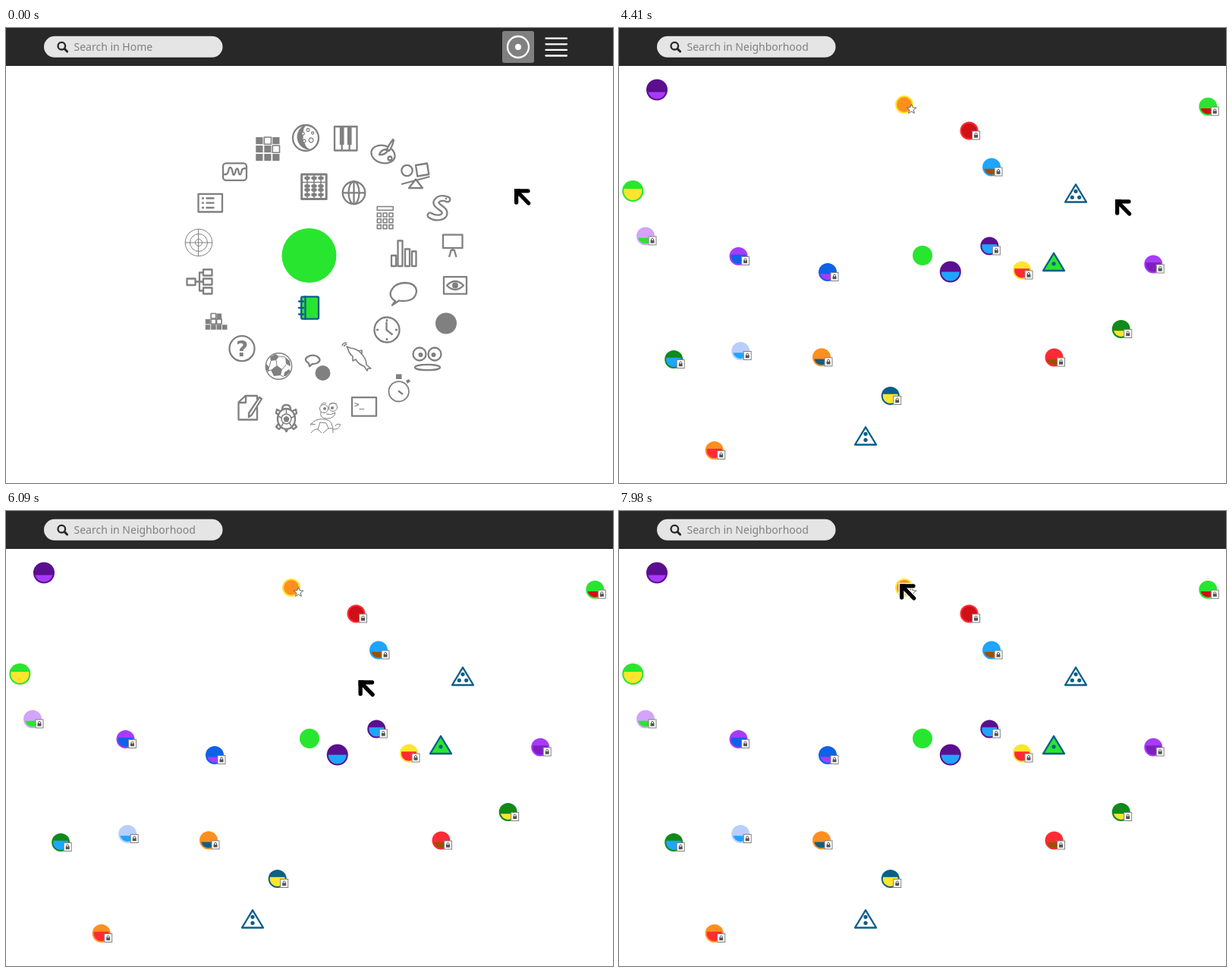
Animation, 800 px wide and 600 px high, one loop 8000 ms. Source, as an HTML page:

```html
<!DOCTYPE html>
<html lang="en">
<head>
<meta charset="utf-8">
<title>Neighborhood view</title>
<style>
  html, body { margin: 0; width: 100%; height: 100%; overflow: hidden; background: #fff; }
  svg { display: block; width: 100vw; height: 100vh; }
  .search { font: 500 14px "Noto Sans", sans-serif; fill: #808080; }
  .title { font: 48px "DejaVu Sans", sans-serif; fill: #808080; }
  .key { font: bold 62px "DejaVu Sans", sans-serif; }
  .help { font: bold 28px "DejaVu Sans", sans-serif; text-anchor: middle; }
  .prompt { font: bold 11px "DejaVu Sans Mono", monospace; }
  .line { fill: none; stroke: #808080; stroke-width: 2.3; stroke-linejoin: round; }
  .thin { stroke-width: 1; }
  .solid { fill: #808080; stroke: none; }
</style>
</head>
<body>
<svg viewBox="0 0 800 600">
  <defs>
    <g id="header">
      <rect width="800" height="50" fill="#282828"/>
      <rect x="50" y="10.8" width="235.5" height="28" rx="14" fill="#e5e5e5"/>
      <g fill="none" stroke="#282828">
        <circle cx="73.3" cy="23.7" r="4.8" stroke-width="2.3"/>
        <path d="M77 27.4L80.6 31" stroke-width="3" stroke-linecap="round"/>
      </g>
    </g>
    <g id="lock">
      <rect x="-5" y="-5.5" width="10" height="11" fill="#fff" stroke="#808080"/>
      <rect x="-2.5" y="-.5" width="5" height="3.7" fill="#555"/>
      <path d="M-1.5 0V-1.5a1.5 1.5 0 0 1 3 0V0" fill="none" stroke="#555"/>
    </g>
    <path id="arrow" d="M2.6 18V2.8H18M4 4L18.6 19" fill="none" stroke-linecap="round"/>
    <path id="snake" d="M582 226q-10-4-15 3c-2 6 10 8 11 14 1 8-12 9-19 4" fill="none" stroke-linecap="round"/>
  </defs>

  <g class="scene">
    <use href="#header"/>
    <text class="search" x="89.5" y="30">Search in Home</text>
    <rect x="654" y="4" width="42" height="42" rx="3" fill="#808080"/>
    <g fill="none" stroke="#fff" stroke-width="2.3">
      <circle cx="675" cy="25" r="14"/>
      <path d="M711.5 13.7h27.5m-27.5 7.6h27.5m-27.5 7.6h27.5m-27.5 7.6h27.5" stroke-linecap="round"/>
    </g>
    <circle cx="675" cy="25" r="4" fill="#fff"/>

    <circle cx="399.5" cy="300" r="36" fill="#28e62f"/>
    <g stroke="#0b5e8a" stroke-width="2.3" fill="#28e62f">
      <rect x="389.2" y="354.3" width="22.8" height="29.3" rx="1.5"/>
      <path d="M394.5 354v30M386 360.5h6M386 369h6M386 377.5h6" stroke-linecap="round"/>
    </g>

    <g class="line" id="icons">
      <!-- moon -->
      <circle cx="395" cy="145" r="17"/>
      <path class="solid" d="M394 128a17 17 0 0 0 9 32.5q-8-2-9-8-4-4-2-9-3-4 0-8 0-4 4-7.500z"/>
      <path stroke-width="1.3" d="M398 132.500a2 2 0 1 0 .1 0M391 137a2.200 2.200 0 1 0 .1 0M402 145a3 3 0 1 0 .1 0M393 147a2 2 0 1 0 .1 0M404 137a1.5 1.5 0 1 0 .1 0"/>
      <!-- piano -->
      <rect x="433" y="130" width="29.5" height="31.5"/>
      <path d="M442.700 130v31M452.700 130v31"/>
      <path stroke-width="5.700" d="M442.700 130v24M452.700 130v24"/>
      <!-- palette -->
      <ellipse cx="497" cy="166.500" rx="15.800" ry="11.500" transform="rotate(15 497 166.500)"/>
      <circle cx="506" cy="172" r="2.5"/>
      <path fill="#fff" d="M510 147q-6 8-8 13l3 2q4-5 6-14zM500 160q-6 1-8 7 7 1 11-5z"/>
      <!-- seesaw -->
      <circle cx="528.5" cy="188" r="7.2"/>
      <path d="M540 181l15-2.5 2.3 14.5-15 2.5zM521 206l37.5-10M540 199.500l-9 11.500h18z"/>
      <!-- snake -->
      <use href="#snake" stroke-width="9"/>
      <use href="#snake" stroke="#fff" stroke-width="4.500"/>
      <circle class="solid" cx="580" cy="225" r="1.3"/>
      <!-- easel -->
      <rect x="576" y="272.700" width="25.5" height="17.500"/>
      <path d="M588.7 290v4M587 292l-3 10M590.5 292l3 10"/>
      <!-- eye -->
      <rect x="577" y="328.2" width="30" height="22.5"/>
      <path d="M581 339.5q11-11 22 0-11 11-22 0z"/>
      <circle class="solid" cx="592" cy="339.5" r="4"/>
      <circle class="solid" cx="580" cy="389.5" r="14"/>
      <!-- face -->
      <circle cx="545" cy="430" r="8.5"/><circle cx="565" cy="430" r="8.5"/>
      <circle class="solid" cx="546.5" cy="431" r="3"/><circle class="solid" cx="563.5" cy="431" r="3"/>
      <ellipse cx="555.5" cy="447.5" rx="16.5" ry="3.7"/>
      <!-- stopwatch -->
      <circle cx="517.7" cy="479.3" r="13.2" stroke-width="1.8"/>
      <path class="solid" d="M514 456.5h7.5v6.5h-7.5zM527 465l4-2 2 3-4 3z"/>
      <path d="M517 478.5l6 4.5"/>
      <!-- terminal -->
      <rect x="456" y="487.2" width="32" height="24.5"/>
      <text class="solid prompt" x="459" y="500">&gt;_</text>
      <!-- tortoise -->
      <g class="thin">
        <circle cx="419" cy="502" r="5.5"/><circle cx="431" cy="500" r="5.5"/>
        <circle class="solid" cx="420" cy="502" r="2"/><circle class="solid" cx="430" cy="501" r="2"/>
        <path d="M415 498q2-5 7-3M426 496q6-3 10 0M415 506q-2 9 8 9t11-8q-5 4-12 2M401 524q6-10 19-8 12 1 11 18M402 534q3-5 9-5l5 5M411 529l3-9 8 1 3 7-7 6M401 522l7 1M425 528h6M431 529c9 1 8-5 10-6q-6-2-7 2"/>
      </g>
      <!-- turtle -->
      <path d="M364 503q0-6 5.500-6t5.500 6M361 505l-4-2-1 5 3 2M378 505l4-2 1 5-3 2M359 522l-3 4 4 3 3-3M380 522l3 4-4 3-3-3M368 530l1.500 2 1.500-2"/>
      <ellipse cx="369.500" cy="515.500" rx="11.500" ry="13.500"/>
      <circle cx="369.500" cy="515.500" r="6.500" stroke-width="1.500"/>
      <path class="solid" d="M369.500 511.500l4 3-1.500 5h-5l-1.500-5z"/>
      <path stroke-width="1.500" d="M369.500 503v6M359 512l4 2M380 512l-4 2M363 525l2.500-4M376 525l-2.500-4"/>
      <!-- write -->
      <path d="M331 499v17.500h-24.500v-23l9-8.500H331v5M307 494h9v-9M334 487l3 2-13 21-4 3v-5z"/>
      <!-- ball -->
      <circle cx="359.5" cy="446" r="17.2" stroke-width="1.4"/>
      <path class="solid" d="M357 445l7 5-2 8-9 1-4-8zM348 434l7-4 5 3-4 5-7 1zM343 443l4 4-1 7-3-4zM368 434l6 5 1 7-6-3zM367 454l6-4 2 3-6 6-3 0z"/>
      <path class="thin" d="M357 445l-1-7M364 450l5-6M362 458l4 2M349 451l-3 1M349 439l-2 8M360 433l8 1"/>
      <!-- chat -->
      <path d="M399 442q-7-4-2-8 6-4 13-1 7 5 0 9-3 1-6 1l-4 3z"/>
      <circle class="solid" cx="417.5" cy="455" r="10"/>
      <!-- help -->
      <circle cx="311" cy="422.7" r="16.5"/>
      <text class="solid help" x="311" y="433">?</text>
      <!-- mind map -->
      <path d="M238.5 330.5h11v8.500h-11zM260 318.500h11.500v8h-11.500zM260 330.500h11.500v8h-11.500zM260 342.500h11.500v8h-11.500zM249.500 334.500H260M260 322.500h-5v24h5"/>
      <!-- target -->
      <g class="thin">
        <circle cx="254" cy="283" r="17.8"/><circle cx="254" cy="283" r="11.500"/><circle cx="254" cy="283" r="4.5"/>
        <path d="M253.500 265v36M236 283h36"/>
      </g>
      <!-- list -->
      <rect x="253.5" y="218.8" width="31.5" height="23.7"/>
      <path d="M263.5 224.5h11M263.5 230.7h11M263.5 237h11M258 224.5h3M258 230.7h3M258 237h3"/>
      <!-- wave -->
      <rect x="286" y="178.3" width="31" height="22.5" rx="4"/>
      <path d="M287 193q5 1 6-4 1-6 3-5 2 1 3 8 1 4 3-1l1-4q2-3 3 0l1 5q2 3 3-1l1-4q1-2 5-2"/>
      <!-- abacus -->
      <rect x="389.7" y="193" width="32.5" height="32.5" stroke-width="3"/>
      <path stroke-width="1.6" d="M397 193v32M406 193v32M415 193v32M390 203.500h32"/>
      <!-- globe -->
      <circle cx="458.5" cy="217.3" r="14.8"/>
      <ellipse cx="458.5" cy="217.3" rx="7" ry="14.8"/>
      <path d="M458.5 202.500v29.500M444 217.300h29"/>
      <!-- calculator -->
      <rect x="489.2" y="235.5" width="21" height="4.8" stroke-width="1.5"/>
      <!-- chart -->
      <path d="M508 300h6v14h-6zM516.500 280.500h6v33.500h-6zM526 291.500h6v22.500h-6zM535 294.500h5.500v19.500h-5.500z"/>
      <!-- bubble -->
      <path d="M513 360q-8-5-6-12 4-11 18-12 15 0 16 11-1 13-18 13-3 0-5-.5l-9 6z"/>
      <!-- clock -->
      <circle cx="502" cy="398" r="16.5"/>
      <path d="M501.5 387.500v10.500l8 6.500M502 384v3M502 409v3M488 398h3M513 398h3"/>
      <!-- dolphin -->
      <path stroke-width="1.6" d="M449 420l5 2q9 1 14 7 7 7 7 15l6 5-4 0-1 3-4-6q-7-2-11-9l-4 2 0-6q-5-4-6-9zM464 426l5-1 0 5M443 419q1-4 6-4M445.500 420q1-3 4-3"/>
    </g>
  </g>

  <g class="scene">
    <g fill="none" stroke="#1e1e1e" stroke-width="8">
      <rect x="279.5" y="157" width="239" height="180" rx="9"/>
      <rect x="279.5" y="157" width="239" height="143.3" rx="9"/>
    </g>
    <text class="key" x="307" y="225.3">f1</text>
    <circle cx="454.5" cy="229" r="37.5"/>
    <g id="dots" fill="#fff"></g>
    <text class="title" x="94.8" y="402">Press Neighbourhood key</text>
  </g>

  <g class="scene">
    <use href="#header"/>
    <text class="search" x="89.5" y="30">Search in Neighborhood</text>
    <g id="networks"></g>
    <path d="M385.5 100.500l1.700 4.300 4.600.3-3.600 2.900 1.200 4.500-3.900-2.500-3.900 2.500 1.200-4.500-3.600-2.900 4.600-.3z" fill="#fff" stroke="#666"/>
    <circle cx="400" cy="300" r="13" fill="#28e62f"/>
    <g id="meshes" stroke="#0b5e8a" stroke-width="2.3" stroke-linejoin="round"></g>
  </g>

  <g id="cursor">
    <use href="#arrow" stroke="#fff" stroke-width="8"/>
    <use href="#arrow" stroke="#000" stroke-width="5.3"/>
    <path d="M0 8V0H8z"/>
  </g>
</svg>
<script>
const $ = id => document.getElementById(id);
const add = (id, markup) => $(id).insertAdjacentHTML("beforeend", markup);
const circle = (x, y, r, attrs = "") => `<circle cx="${x}" cy="${y}" r="${r}" ${attrs}/>`;
const box = (x, y, w, h, attrs = "") => `<rect x="${x}" y="${y}" width="${w}" height="${h}" ${attrs}/>`;

// Small repeated parts of the home icons; "#" is filled, "o" is outlined.
function cells(rows, x, y, pitch, size) {
  rows.forEach((row, j) => [...row].forEach((c, i) => {
    if (c !== " ") add("icons", box(x + i * pitch, y + j * pitch, size, size,
      c === "#" ? 'class="solid"' : 'stroke-width="1.6"'));
  }));
}
cells(["#o#", "##o", "###"], 329.3, 144, 11, 9.2);
cells([" o# ", "#oo ", "####"], 262.8, 376.5, 7.4, 6.5);
cells(["ooo", "ooo", "ooo"], 489.3, 244, 7.8, 5);
for (const x of [397, 406, 415])
  for (const y of [198, 208.5, 213.5, 220])
    add("icons", `<ellipse class="solid" cx="${x}" cy="${y}" rx="3.8" ry="2.4"/>`);

for (let i = 0; i < 8; i++) {
  const a = i * Math.PI / 4;
  add("dots", circle(454.5 + 23.5 * Math.cos(a), 229 + 23.3 * Math.sin(a), 6.3));
}

const color = {
  purple: "#5b0e8f", violet: "#a83bfb", plum: "#7f1fc0", lilac: "#d2a4fa",
  orange: "#ff8f1f", yellow: "#ffe52e", red: "#ff2b34", crimson: "#d10f16",
  sky: "#1ea5ff", blue: "#0d62e8", pale: "#b9cffb", teal: "#0b5e8a",
  green: "#28e62f", forest: "#108a1a", brown: "#9a5200"
};

// x, y, ring, filling, filling start relative to the centre, kind
const networks = [
  [50, 81.5, "purple", "violet", 3, "big"],
  [376, 101, "yellow", "orange", -10, "star"],
  [461.5, 135.5, "red", "crimson", -10],
  [491, 183.5, "sky", "brown", 2.3],
  [776.3, 103.7, "green", "crimson", 2.3],
  [18.3, 215, "green", "yellow", -3, "big"],
  [35, 274.5, "lilac", "green", 2.3],
  [157.5, 301, "violet", "blue", -2.3],
  [275, 322, "blue", "violet", 2.3],
  [436.8, 321.5, "purple", "sky", 0, "big"],
  [488.3, 287.5, "purple", "sky", -2.3],
  [531, 319.5, "yellow", "red", -2.3],
  [704.2, 311.5, "violet", "plum", -2.3],
  [661.7, 397, "forest", "yellow", 2.3],
  [72.2, 437, "forest", "sky", -2.3],
  [160.2, 426, "pale", "sky", 2.3],
  [267, 434.3, "orange", "teal", 2.3],
  [573.5, 434.5, "red", "brown", 2.3],
  [357.7, 485, "teal", "yellow", -2.3],
  [125.7, 557, "orange", "red", -2.3]
];
for (const [x, y, ring, filling, level, kind = "lock"] of networks) {
  const r = kind === "big" ? 14 : 12, inner = r - 2;
  const half = Math.sqrt(inner * inner - level * level);
  const fill = half === 0
    ? circle(x, y, inner, `fill="${color[filling]}"`)
    : `<path d="M${x - half} ${y + level}A${inner} ${inner} 0 ${+(level < 0)} 0 ${x + half} ${y + level}Z" fill="${color[filling]}"/>`;
  add("networks", circle(x, y, r, `fill="${color[ring]}"`) + fill +
    (kind === "lock" ? `<use href="#lock" x="${x + 9}" y="${y + 6}"/>` : ""));
}

function mesh(x, top, fill, dots) {
  add("meshes", `<path d="M${x} ${top}l14 23.2h-28z" fill="${fill}"/>` +
    dots.map(([dx, dy]) => circle(x + dx, top + dy, 2.6, `fill="${color.teal}" stroke="none"`)).join(""));
}
mesh(602, 206.3, "#fff", [[0, 9], [-4.7, 17], [4.7, 17]]);
mesh(325, 526.3, "#fff", [[0, 9], [0, 17]]);
mesh(573, 296.8, color.green, [[0, 14]]);

// Cursor way points: time, x, y
const way = [
  [3500, 670, 212], [4270, 662, 220], [4410, 654, 226], [5110, 587.5, 239.5],
  [5600, 525, 238], [5950, 481, 231], [6580, 410, 189], [6790, 396, 171],
  [7630, 370.5, 101], [7980, 370, 96]
];
const slope = (i, k) => i === 0 || i === way.length - 1 ? 0
  : (way[i + 1][k] - way[i - 1][k]) / (way[i + 1][0] - way[i - 1][0]);

// Smooth cubic through the way points
function cursorAt(t) {
  let i = 0;
  while (i < way.length - 2 && t >= way[i + 1][0]) i++;
  const span = way[i + 1][0] - way[i][0];
  const u = Math.min(1, Math.max(0, (t - way[i][0]) / span)), v = 1 - u;
  return [1, 2].map(k =>
    v * v * (1 + 2 * u) * way[i][k] + u * u * (3 - 2 * u) * way[i + 1][k] +
    u * v * span * (v * slope(i, k) - u * slope(i + 1, k)));
}

const LOOP = 8000, STEP = 70;
const scenes = document.querySelectorAll(".scene");
const start = performance.now();

function draw() {
  const t = (performance.now() - start) % LOOP;
  const current = t < 1260 ? 0 : t < 3500 ? 1 : 2;
  scenes.forEach((scene, i) => scene.style.display = i === current ? "" : "none");
  $("cursor").style.display = current === 1 ? "none" : "";
  const [x, y] = cursorAt(Math.floor(t / STEP) * STEP);
  $("cursor").setAttribute("transform", `translate(${x} ${y})`);
  requestAnimationFrame(draw);
}
draw();
</script>
</body>
</html>
```
